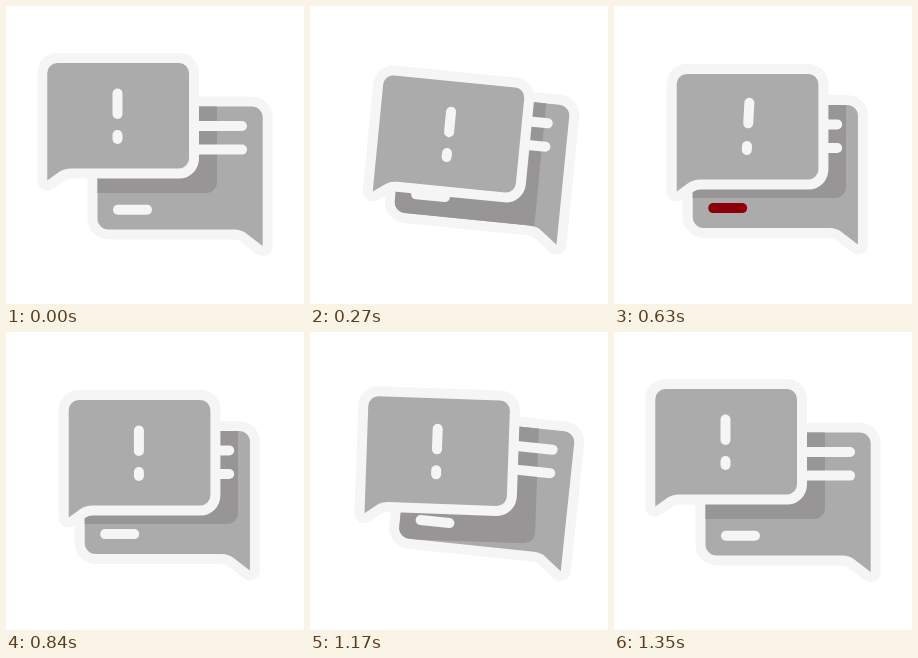
Animation of 298 by 298 pixels, one loop 1.5 s. Source, as an HTML page with a canvas:

```html
<!DOCTYPE html>
<html lang="en">
<head>
<meta charset="utf-8">
<title>Chat alert</title>
<style>
  html, body { margin: 0; width: 100%; height: 100%; overflow: hidden; background: #fff; }
  canvas { display: block; width: 100vmin; height: 100vmin; }
</style>
</head>
<body>
<canvas></canvas>
<script>
const SIZE = 298, LOOP = 1500, STEP = 30;
const GRAY = '#acabac', SHADE = '#979596', PALE = '#f5f5f5', RED = '#8c000c';

const canvas = document.querySelector('canvas');
const ctx = canvas.getContext('2d');
const scale = Math.max(1, devicePixelRatio);
canvas.width = canvas.height = SIZE * scale;

// Both bubbles pivot on the tips of their tails.
const frontTip = [41.3, 174.5], backTip = [256.7, 240];
const frontShape = new Path2D(
  'M41.3 174.5V67a10 10 0 0 1 10-10H173a10 10 0 0 1 10 10V152.5a10 10 0 0 1-10 10H65Q58 162.5 53 166Z');
const backShape = new Path2D(
  'M256.7 240V111.5a11 11 0 0 0-11-11H102.500a11 11 0 0 0-11 11V212.500a11 11 0 0 0 11 11H228Q236 223.500 241 228Z');
const shadowShape = new Path2D('M-90-40H211V176a11 11 0 0 1-11 11H-90Z');

// time, front shift, front angle, back shift, back angle, shadow x, shadow y
const poses = [
  [90, 0, 0, 0, 0, 0, 0],
  [135, .03, -4.5, .06, -2, 3, 7],
  [180, .3, -2, .2, 2, 2, 12],
  [225, .75, 4, .5, 7, -4, 20],
  [270, 1, 5.6, .8, 5.7, -7, 25],
  [315, 1, 2.5, .95, 2.5, -3, 11],
  [360, 1, 0, 1, 0, 0, 0],
  [1080, 1, 0, 1, 0, 0, 0],
  [1110, .97, 5.5, .92, 5.5, 0, 8],
  [1155, .75, 5, .55, 8, 0, 16],
  [1200, .35, -4, .3, 2, 4, 15],
  [1230, .15, -8, .2, -3.3, 5.5, 13],
  [1290, .03, -4, .05, -1.5, 3, 6],
  [1350, 0, 0, 0, 0, 0, 0]
];

function poseAt(t) {
  const next = poses.findIndex(p => p[0] > t);
  if (next <= 0) return poses[0].slice(1);
  const a = poses[next - 1], b = poses[next];
  const k = (t - a[0]) / (b[0] - a[0]);
  return a.map((v, i) => v + (b[i] - v) * k).slice(1);
}

function rotateAbout([x, y], degrees) {
  ctx.translate(x, y);
  ctx.rotate(degrees * Math.PI / 180);
  ctx.translate(-x, -y);
}

function place(dx, dy, pivot, degrees) {
  ctx.setTransform(scale, 0, 0, scale, 0, 0);
  ctx.translate(dx, dy);
  rotateAbout(pivot, degrees);
}

function bubble(shape) {
  ctx.lineWidth = 20;
  ctx.strokeStyle = PALE;
  ctx.stroke(shape);
  ctx.fillStyle = GRAY;
  ctx.fill(shape);
}

function bar(x1, y1, x2, y2, color = PALE) {
  ctx.lineWidth = 10;
  ctx.strokeStyle = color;
  ctx.beginPath();
  ctx.moveTo(x1, y1);
  ctx.lineTo(x2, y2);
  ctx.stroke();
}

function draw(t) {
  const [frontShift, frontAngle, backShift, backAngle, shadowX, shadowY] = poseAt(t);
  const flash = (from, to) => t >= from && t < to ? RED : PALE;
  const placeBack = () => place(-12.8 * backShift, -1.6 * backShift, backTip, backAngle);

  ctx.setTransform(scale, 0, 0, scale, 0, 0);
  ctx.fillStyle = '#fff';
  ctx.fillRect(0, 0, SIZE, SIZE);
  ctx.lineCap = ctx.lineJoin = 'round';

  placeBack();
  bubble(backShape);
  ctx.save();
  ctx.clip(backShape);
  place(21 * frontShift + shadowX, 5 * frontShift + shadowY, frontTip, frontAngle);
  ctx.fillStyle = SHADE;
  ctx.fill(shadowShape);
  ctx.restore();

  placeBack();
  bar(130, 120, 236, 120, flash(360, 450));
  bar(130, 143.6, 236, 143.6, flash(450, 555));
  bar(112, 203.7, 141, 203.7, flash(555, 655));

  place(21.4 * frontShift, 11 * frontShift, frontTip, frontAngle);
  bubble(frontShape);

  // The exclamation mark dips, rebounds and wobbles to rest.
  const u = Math.min(1, Math.max(0, (t - 345) / 495));
  const hop = 9 * (1 - u) * Math.sin(2 * Math.PI * u);
  const tilt = 9 * (1 - u) * Math.sin(4 * Math.PI * u);
  rotateAbout([111.5, 131], tilt);
  bar(111.5, 87.5 + hop, 111.5, 108 + hop);
  bar(111.5, 129, 111.5, 133);
}

function frame() {
  draw(Math.floor(performance.now() % LOOP / STEP) * STEP);
  requestAnimationFrame(frame);
}
frame();
</script>
</body>
</html>
```
